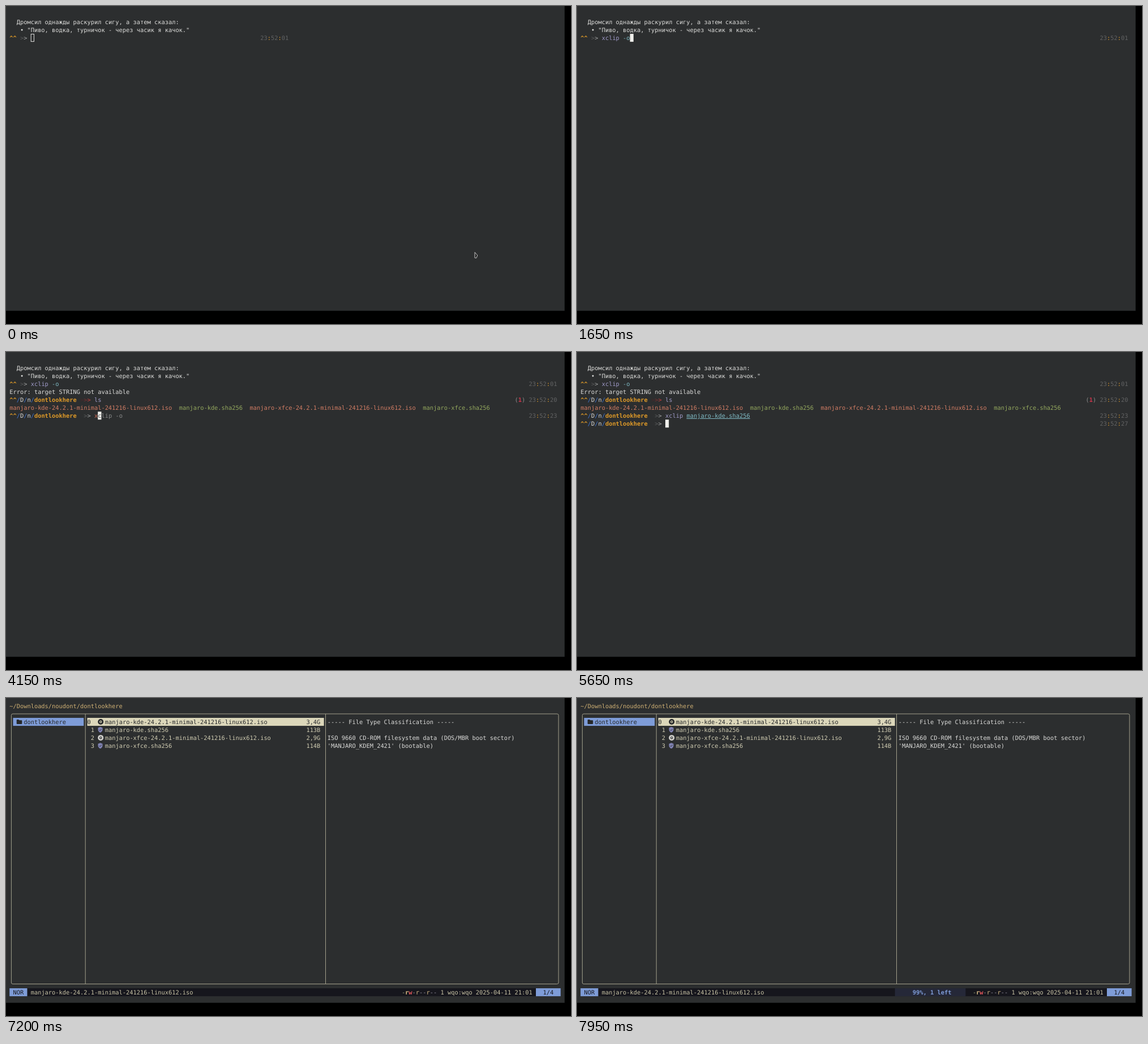
Write an HTML page that moves like this. It is 998 by 561 pixels and loops after 8 s.

```html
<!DOCTYPE html>
<html lang="ru">
<head>
<meta charset="utf-8">
<title>Terminal</title>
<style>
  html, body { margin: 0; width: 100%; height: 100%; overflow: hidden; background: #000; }
  svg { display: block; width: 100vw; height: 100vh; }
  text { font: 10.365px "DejaVu Sans Mono", monospace; white-space: pre; text-rendering: geometricPrecision; }
  .bold { font-weight: bold; }
  .under { text-decoration: underline; }
</style>
</head>
<body>
<svg viewBox="0 0 998 561">
  <rect width="998" height="561" fill="#000"/>
  <rect width="986.7" height="537.7" fill="#2c2e2f"/>
  <g id="screen"></g>
  <path id="mouse" d="M.5 .5V10.3L3.2 10.6 5.2 5.8Z" fill="#222" stroke="#ddd" stroke-width=".9"/>
</svg>
<script>
const CELL = 6.24, ROW = 14.03, LOOP = 8000;
const C = {
  fg: '#dcdcda', dim: '#626364', hint: '#8a8b8b', orange: '#df9a28', blue: '#3d72cf',
  bad: '#d0705a', cmd: '#a09bc9', arg: '#7fb9c3', iso: '#d27d64', sum: '#94a85e',
  cream: '#dcd7ba', cell: '#efefeb', ink: '#26282a', panel: '#16161d', accent: '#7e9cd8'
};
const screen = document.getElementById('screen');
const mouse = document.getElementById('mouse');
const X = col => CELL * (col + 1);
const Y = row => 7 + ROW * row;

function add(tag, attrs, content = '') {
  const node = document.createElementNS('http://www.w3.org/2000/svg', tag);
  for (const key in attrs) node.setAttribute(key, attrs[key]);
  node.textContent = content;
  screen.append(node);
}
const box = (row, from, to, fill) =>
  add('rect', { x: X(from), y: Y(row), width: X(to) - X(from), height: ROW, fill });

// Each run is [text, colour, class]; runs follow one another on the grid.
function put(row, col, ...runs) {
  for (const [text, fill = C.fg, cls = ''] of runs) {
    add('text', { x: X(col), y: Y(row) + 10.7, fill, class: cls }, text);
    col += text.length;
  }
}

function clock(row, col, time) {
  const [h, m, s] = time.split(':');
  put(row, col, [h, C.dim], [':', C.orange], [m, C.dim], [':', C.orange], [s, C.dim]);
}

function prompt(row, home, failed) {
  const shades = failed ? ['#4a2829', '#7c2f2f', '#c93b3b'] : ['#303233', '#5b5c5d', '#a2a3a3'];
  if (home) put(row, 0, ['^^', C.orange, 'bold']);
  else put(row, 0, ['^^', C.orange, 'bold'], ['/', C.blue], ['D'], ['/', C.blue], ['n'],
    ['/', C.blue], ['dontlookhere', C.orange, 'bold']);
  put(row, home ? 2 : 20, ...shades.map(shade => ['>', shade]));
}

function cursor(row, col, hollow) {
  if (!hollow) return box(row, col, col + 1, C.cell);
  add('rect', { x: X(col) + .5, y: Y(row) + .5, width: CELL - 1, height: ROW - 1,
    fill: 'none', stroke: '#e2e2e0' });
}

// Command line being edited: typed text, ghost suggestion and block cursor.
function input(row, col, typed, ghost = '') {
  const [, word, rest] = typed.match(/^(\S*)(.*)$/);
  const known = ['xclip', 'ls', 'yazi'].includes(word);
  const isFile = rest.length > 3;
  put(row, col, [word, known ? C.cmd : C.bad]);
  if (isFile) put(row, col + word.length + 1, [rest.slice(1), C.arg, 'under']);
  else put(row, col + word.length, [rest, C.arg]);
  const end = col + typed.length;
  cursor(row, end);
  put(row, end, [ghost.slice(0, 1), '#555'], [ghost.slice(1), C.hint]);
}

function greeting() {
  put(1, 2, ['Дромсил однажды раскурил сигу, а затем сказал:']);
  put(2, 3, ['• "Пиво, водка, турничок - через часик я качок."']);
  prompt(3, true);
}
function idle(hollow) {
  greeting();
  clock(3, 71, '23:52:01');
  cursor(3, 6, hollow);
}
function first(typed) {
  greeting();
  clock(3, 147, '23:52:01');
  input(3, 6, typed);
}
function second(typed, ghost) {
  greeting();
  put(3, 6, ['xclip', C.cmd], [' -o', C.arg]);
  clock(3, 147, '23:52:01');
  put(4, 0, ['Error: target STRING not available']);
  prompt(5, false, true);
  put(5, 143, ['(', C.hint], ['1', '#cf344b', 'bold'], [')', C.hint]);
  clock(5, 147, '23:52:20');
  if (typed !== undefined) input(5, 24, typed, ghost);
}
function third(typed, ghost) {
  second();
  put(5, 24, ['ls', C.cmd]);
  put(6, 0, ['manjaro-kde-24.2.1-minimal-241216-linux612.iso  ', C.iso], ['manjaro-kde.sha256  ', C.sum],
    ['manjaro-xfce-24.2.1-minimal-241216-linux612.iso  ', C.iso], ['manjaro-xfce.sha256', C.sum]);
  prompt(7);
  clock(7, 147, '23:52:23');
  if (typed !== undefined) input(7, 24, typed, ghost);
}
function fourth(typed) {
  third();
  put(7, 24, ['xclip ', C.cmd], ['manjaro-kde.sha256', C.arg, 'under']);
  prompt(8);
  clock(8, 147, '23:52:27');
  input(8, 24, typed);
}

function discIcon(row, fill, hole) {
  const cx = X(25) + 5, cy = Y(row) + ROW / 2;
  add('circle', { cx, cy, r: 5, fill });
  add('circle', { cx, cy, r: 1.7, fill, stroke: hole, 'stroke-width': 1.1 });
}
function shieldIcon(row) {
  const transform = `translate(${X(25) + .3} ${Y(row) + 2})`;
  add('path', { transform, d: 'M4 0L8 1.5V5Q7.5 8.5 4 10Q.5 8.5 0 5V1.5Z', fill: '#8083b4' });
  add('path', { transform, d: 'M2 5L3.5 6.5 6.2 3.5', fill: 'none', stroke: '#2c2e2f' });
}

function manager(busy) {
  const line = { fill: 'none', stroke: '#a3a08c', 'stroke-width': 1 };
  put(0, 0, ['~/Downloads/noudont/dontlookhere', '#cfb074']);
  add('rect', { x: 9.4, y: 28, width: 966.6, height: 476.5, rx: 2.5, ...line });
  for (const x of [140.2, 564.5]) add('path', { d: `M${x} 28V504.5`, ...line });

  box(2, 1, 21, C.accent);
  add('path', { transform: `translate(${X(2)} ${Y(2) + 3})`,
    d: 'M0 1Q0 0 1 0H3.5L5 1.3H8.6Q9.6 1.3 9.6 2.3V7Q9.6 8 8.6 8H1Q0 8 0 7Z', fill: C.ink });
  put(2, 4, ['dontlookhere', C.ink]);

  box(2, 22, 89, C.cream);
  const files = [
    ['manjaro-kde-24.2.1-minimal-241216-linux612.iso', '3,4G'],
    ['manjaro-kde.sha256', '113B'],
    ['manjaro-xfce-24.2.1-minimal-241216-linux612.iso', '2,9G'],
    ['manjaro-xfce.sha256', '114B']
  ];
  files.forEach(([name, size], i) => {
    const row = i + 2, fill = i ? '#d0ccb2' : C.ink;
    put(row, i ? 23 : 22, [String(i), fill]);
    if (i % 2) shieldIcon(row);
    else discIcon(row, i ? '#d0cfcb' : C.ink, i ? C.ink : C.cream);
    put(row, 27, [name, fill]);
    put(row, 84, [size, fill]);
  });

  put(2, 90, ['----- File Type Classification -----']);
  put(4, 90, ['ISO 9660 CD-ROM filesystem data (DOS/MBR boot sector)']);
  put(5, 90, ["'MANJARO_KDEM_2421' (bootable)"]);

  box(36, 5, 149, C.panel);
  box(36, 0, 5, C.accent);
  put(36, 1, ['NOR', C.panel]);
  put(36, 6, ['manjaro-kde-24.2.1-minimal-241216-linux612.iso', '#c8c3a5']);
  if (busy) {
    box(36, 89, 109, '#252838');
    put(36, 94, ['99%, 1 left', C.accent, 'bold']);
  }
  const grey = '#938f9e', sand = '#d8bd85';
  put(36, 111, ['-', '#a5ad80'], ['r', sand, 'bold'], ['w', '#e0565b', 'bold'], ['-', grey], ['r', sand],
    ['--', grey], ['r', sand], ['--', grey], [' 1 wqo:wqo 2025-04-11 21:01', '#c8c3a5']);
  box(36, 149, 156, C.accent);
  put(36, 151, ['1/4', C.panel]);
}

const steps = [
  [0, idle, true], [150, idle, false],
  [950, first, 'x'], [1100, first, 'xc'], [1200, first, 'xcl'], [1300, first, 'xcli'],
  [1400, first, 'xclip'], [1450, first, 'xclip '], [1550, first, 'xclip -'], [1600, first, 'xclip -o'],
  [1750, second, ''], [3150, second, 'l', 's'], [3200, second, 'ls'],
  [3300, third, ''], [4150, third, 'x', 'clip -o'], [4200, third, 'xc', 'lip -o'],
  [4300, third, 'xcl', 'ip -o'], [4350, third, 'xcli', 'p -o'],
  [4500, third, 'xclip', ' -o'], [4600, third, 'xclip ', '-o'],
  [4950, third, 'xclip m', 'anjaro-kde.sha256'], [5150, third, 'xclip manjaro-kde.sha256'],
  [5450, fourth, ''], [6250, fourth, 'y'], [6400, fourth, 'ya'], [6550, fourth, 'yaz'],
  [6700, fourth, 'yazi'], [7100, manager, false], [7950, manager, true]
];

let shown = -1;
function draw() {
  const t = performance.now() % LOOP;
  const index = steps.findLastIndex(step => step[0] <= t);
  if (index !== shown) {
    const [, scene, ...args] = steps[index];
    screen.replaceChildren();
    scene(...args);
    shown = index;
  }
  // The pointer glides up in 50 ms ticks and hides on the first key.
  const p = Math.min(1, Math.floor(t / 50) / 5);
  const ease = p * p * (3 - 2 * p);
  mouse.setAttribute('transform', `translate(${827.6 - 38 * ease} ${434 - 261 * ease})`);
  mouse.setAttribute('visibility', t < 950 ? 'visible' : 'hidden');
  requestAnimationFrame(draw);
}
draw();
</script>
</body>
</html>
```
